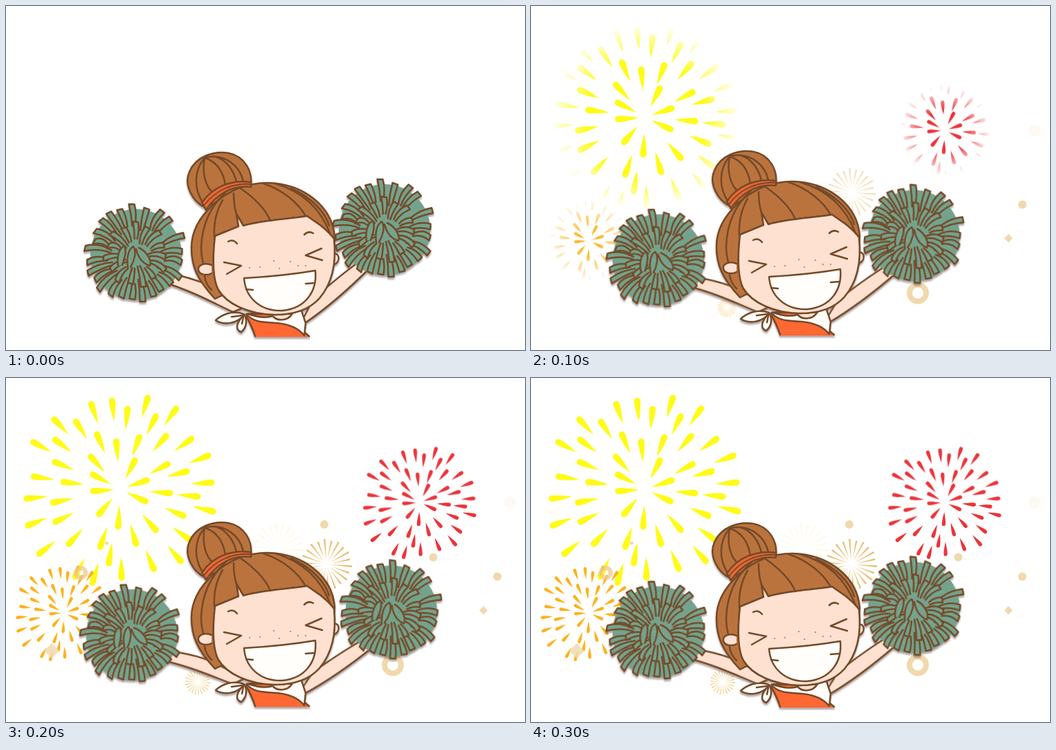
Write an HTML page that moves like this. It is 750 px wide and 498 px high and loops after 0.4 s.

```html
<!DOCTYPE html>
<html lang="en">
<head>
<meta charset="utf-8">
<title>Cheerleader with fireworks</title>
<style>
html, body { margin: 0; width: 100%; height: 100%; overflow: hidden; background: #fff; }
svg { display: block; width: 100%; height: 100%; }
.line { fill: none; }
.ink { stroke: #744a29; stroke-width: 2.5; stroke-linecap: round; stroke-linejoin: round; }
.skin { fill: #ffe1d1; }
.hair { fill: #bb733d; }
.white { fill: #fffefa; }
.orange { fill: #ff6832; }
.gold { fill: #f1d9ae; }
.figure { filter: drop-shadow(0 3px 1px rgba(75, 50, 45, .42)); }

.body, .left, .right, .early, .mid, .late { animation: .4s step-end infinite; }
.body { animation-name: bob; }
.left { animation-name: swing-left; transform-origin: 330px 440px; }
.right { animation-name: swing-right; transform-origin: 430px 420px; }
.early { animation-name: early; }
.mid { animation-name: mid; }
.late { animation-name: late; }
@keyframes bob {
  0% { transform: none; }
  25%, 75% { transform: translateY(-2px); }
  50% { transform: translateY(-3px); }
}
@keyframes swing-left {
  0% { transform: none; }
  25%, 75% { transform: rotate(-3deg); }
  50% { transform: rotate(-4.7deg); }
}
@keyframes swing-right {
  0% { transform: none; }
  25%, 75% { transform: rotate(4deg); }
  50% { transform: rotate(6.3deg); }
}
@keyframes early { 0% { opacity: 0; } 25%, 100% { opacity: 1; } }
@keyframes mid { 0%, 50%, 100% { opacity: 0; } 25% { opacity: 1; } }
@keyframes late { 0% { opacity: 0; } 50%, 100% { opacity: 1; } }
</style>
</head>
<body>
<svg viewBox="0 0 750 498">
  <defs>
    <path id="drop" d="M-34 0C-21-3-9-5-4-4.5A4.5 4.5 0 0 1-4 4.5C-9 5-21 3-34 0Z"/>
    <g id="burst"></g>
    <g id="rays"></g>
    <g id="pompom"></g>
    <clipPath id="faceClip"><use href="#face"/></clipPath>
  </defs>

  <g id="sky-mid" class="mid"></g>
  <g id="sky-late" class="late"></g>

  <g class="early gold">
    <circle cx="710" cy="287.500" r="6"/>
    <path d="M690 330l6 6.500-6 6-6-6Z"/>
    <circle cx="559" cy="415.500" r="12" fill="none" stroke="#f1d9ae" stroke-width="8"/>
    <circle cx="728" cy="180" r="9" opacity=".15"/>
  </g>
  <g class="late gold">
    <circle cx="460" cy="212" r="6"/>
    <circle cx="617.500" cy="259.500" r="6"/>
    <circle cx="108" cy="282" r="7" fill="none" stroke="#ecca93" stroke-opacity=".75" stroke-width="6.500"/>
    <path d="M66 384l11 11-11 11-11-11Z" opacity=".85"/>
    <circle cx="145.500" cy="239" r="2.500"/>
  </g>

  <g class="figure">
    <g class="ink skin">
      <path class="left" d="M222 381L250 390C270 395 285 400 300 408L345 436 328 443C300 430 268 412 225 399Z"/>
      <path class="right" d="M514 368C492 382 470 402 445 423L428 455 432 459C460 440 490 415 526 379Z"/>
    </g>

    <g class="body ink">
      <g id="torso">
        <path class="orange" stroke="none" d="M345 446L360 479H440L431 470 390 446Z"/>
        <path class="line" d="M347 449Q355 462 360 478M432 473L438 478"/>
        <path class="white" d="M347 446C360 460 375 457 392 459C412 461 424 468 431 477L433 459 427 441H390Z"/>
        <path class="orange" d="M350 446L389 446C382 453 365 451 350 446Z"/>
        <path class="skin" d="M384 447C390 457 407 457 414 445Z"/>
        <path class="white" d="M344 446C327 440 311 447 303 455C314 462 333 461 344 447C332 459 331 469 340 472C348 465 349 455 344 446Z"/>
        <path class="line" d="M341 448L326 450M343 450L341 460"/>
      </g>

      <g id="bun">
        <path class="hair" d="M288 292C268 282 257 258 265 240C274 218 300 209 322 213C346 218 356 240 354 258Z"/>
        <path class="line" d="M286 221C271 240 272 265 284 284M287 220C283 242 288 262 300 271M288 220C305 226 314 240 317 259M289 219C318 214 338 232 343 254M302 218C319 222 330 240 333 255"/>
      </g>

      <path class="hair" d="M300 287C325 264 352 256 378 256C430 257 472 290 475 335L470 382 312 419 302 424C275 395 268 375 268 350C268 325 280 305 300 287Z"/>
      <path fill="#ee6632" d="M283 285C298 262 325 251 354 255L354 262C325 259 303 274 289 295Z"/>
      <path class="line" stroke-width="1.800" d="M286 289C302 267 327 256 353 258"/>

      <path class="skin" d="M472 359C482 356 484 369 475 374L470 376Z"/>
      <path id="face" class="skin" d="M302 333L336 319 333 301 343 318C375 309 407 309 435 304L455 318C463 325 469 330 474 337C478 375 470 403 453 423C437 441 412 447 388 447C350 446 319 431 307 411C298 394 299 360 302 333Z"/>
      <g clip-path="url(#faceClip)" fill="#ffb9a8" stroke="none">
        <ellipse cx="330" cy="415" rx="21" ry="16.500" transform="rotate(12 330 415)"/>
        <ellipse cx="456" cy="404" rx="16" ry="19"/>
      </g>
      <use href="#face" style="fill:none"/>
      <path class="skin" d="M297 375C287 371 277 375 278 382C279 389 290 391 297 387" />
      <path class="line" d="M318 269C293 292 283 320 282 350Q282 362 285 373M313 281C303 298 300 315 301 334M287 391Q288 402 297 411M329 271Q329 289 333 301M339 264C359 278 375 294 382 311M372 257C400 266 422 285 433 304M389 257C427 268 454 291 469 331M412 264C442 278 461 298 467 318"/>

      <path class="line" d="M321 341Q328 337 334 344M431 331Q437 325 444 329"/>
      <path class="line" d="M315 371L340 376 319 388M456 351L433 361 457 368"/>
      <g id="freckles" fill="#c47448" stroke="none"></g>
      <path class="white" d="M344 394Q400 391 447 383C450 414 432 438 399 441C367 442 346 422 344 394Z"/>
      <path class="line" d="M347 410L357 411M433 402L446 401"/>
    </g>

    <g class="left"><use href="#pompom" x="188" y="360"/></g>
    <g class="right"><use href="#pompom" x="547" y="324"/></g>
  </g>
</svg>

<script>
const NS = 'http://www.w3.org/2000/svg';
const el = id => document.getElementById(id);
const rad = deg => deg * Math.PI / 180;

function add(parent, tag, attrs) {
  const node = document.createElementNS(NS, tag);
  for (const key in attrs) node.setAttribute(key, attrs[key]);
  return parent.appendChild(node);
}

// Outer ends of the sparks, around the centre (165, 161).
const sparks = [
  [122,34], [153,29], [176,41], [206,25], [248,41], [218,52], [67,57], [99,60],
  [36,91], [68,87], [130,78], [159,88], [194,82], [234,81], [120,111], [237,123],
  [188,116], [271,86], [296,111], [265,134], [207,147], [301,151], [122,138], [67,120],
  [36,142], [122,164], [64,181], [79,150], [26,175], [28,215], [68,210], [132,200],
  [45,257], [88,243], [135,248], [162,219], [219,223], [189,244], [205,180], [241,167],
  [281,172], [303,194], [260,201], [148,272], [167,293], [215,280], [98,291], [124,300],
  [255,268], [268,236]
];
for (const [x, y] of sparks) {
  const angle = Math.atan2(y - 161, x - 165) * 180 / Math.PI;
  add(el('burst'), 'use', { href: '#drop', transform: `translate(${x - 165} ${y - 161}) rotate(${angle})` });
}

for (let i = 0; i < 22; i++) {
  const inner = i % 2 ? 9 : 5, outer = i % 2 ? 35 : 37;
  add(el('rays'), 'path', { d: `M${inner} 0L${outer}-1.300V1.300Z`, transform: `rotate(${i * 360 / 22 + 4})` });
}

function firework(x, y, scale, color, solid, end) {
  const place = `translate(${x} ${y}) scale(${scale})`;
  const id = 'fade' + x;
  const fade = add(el('sky-mid'), 'radialGradient', { id, gradientUnits: 'userSpaceOnUse', cx: 0, cy: 0, r: 140 });
  add(fade, 'stop', { offset: solid, 'stop-color': color });
  add(fade, 'stop', { offset: end, 'stop-color': color, 'stop-opacity': 0 });
  const group = add(el('sky-mid'), 'g', { transform: place });
  // The gradient must span the whole burst, so each drop is drawn unrotated.
  for (const [sx, sy] of sparks) {
    const dx = sx - 165, dy = sy - 161, r = Math.hypot(dx, dy), ux = dx / r, uy = dy / r;
    const p = (a, b) => `${dx + ux * a - uy * b} ${dy + uy * a + ux * b}`;
    add(group, 'path', {
      fill: `url(#${id})`,
      d: `M${p(-34, 0)}C${p(-21, -3)} ${p(-9, -5)} ${p(-4, -4.5)}A4.500 4.500 0 0 1 ${p(-4, 4.5)}C${p(-9, 5)} ${p(-21, 3)} ${p(-34, 0)}Z`
    });
  }
  add(el('sky-late'), 'use', { href: '#burst', transform: place, fill: color });
}
firework(165, 161, 1, '#fffb16', .62, .97);
firework(598, 180, .587, '#ec343b', .36, .8);
firework(84, 340, .5, '#fdb21b', .2, .85);

function star(layer, x, y, scale, fill, opacity = 1) {
  add(el(layer), 'use', { href: '#rays', transform: `translate(${x} ${y}) scale(${scale})`, fill, opacity });
}
star('sky-mid', 463, 270, .95, '#ecc98c', .6);
star('sky-mid', 283, 437, .36, '#f5c765');
star('sky-late', 463, 270, 1, '#e6bd72');
star('sky-late', 277, 440, .5, '#efc66f');
star('sky-late', 393, 247, 1, '#fff9e6');

for (const [cx, cy] of [[352,379], [367,378], [387,369], [395,380], [411,370], [422,376], [433,376]])
  add(el('freckles'), 'circle', { cx, cy, r: 1.1 });

// A ribbon runs outwards along x, bows sideways and is cut square at its tip.
function ribbon(angle, from, to, width) {
  const bow = -6 * Math.cos(rad(angle)) - 2 * Math.sin(rad(angle * 5));
  const middle = (from + to) / 2, half = width / 2;
  add(el('pompom'), 'path', {
    class: 'ink', fill: '#74a38d', transform: `rotate(${angle})`,
    d: `M${from} ${-half * .5}Q${middle} ${bow - half} ${to} ${-half}L${to - 1} ${half}Q${middle} ${bow + half} ${from} ${half * .5}`
  });
}

add(el('pompom'), 'circle', { r: 66, fill: '#74a38d' });
const tips = [
  [265,74], [283,69], [301,74], [314,73], [338,75], [356,67], [10,67], [28,73], [40,67],
  [55,64], [67,66], [82,69], [95,65], [109,66], [122,70], [137,75], [148,70], [159,75],
  [171,72], [187,75], [197,64], [210,69], [225,72], [237,73], [250,70]
];
tips.forEach(([angle, r], i) => ribbon(angle, i % 2 ? 36 : 42, r, 8));
for (let i = 0; i < 15; i++) ribbon(i * 24 + 5, 17 + i % 3 * 3, 43 + i % 2 * 5, 7.5);
add(el('pompom'), 'path', {
  class: 'ink', fill: '#74a38d',
  d: 'M-26 16C-28 4-25-9-17-13C-13-5-17 6-20 15M-12 18C-14 4-11-8-4-12C1-5-2 8-8 18M0-8C3 4 10 13 20 16C23 8 15-5 4-10'
});
</script>
</body>
</html>
```
